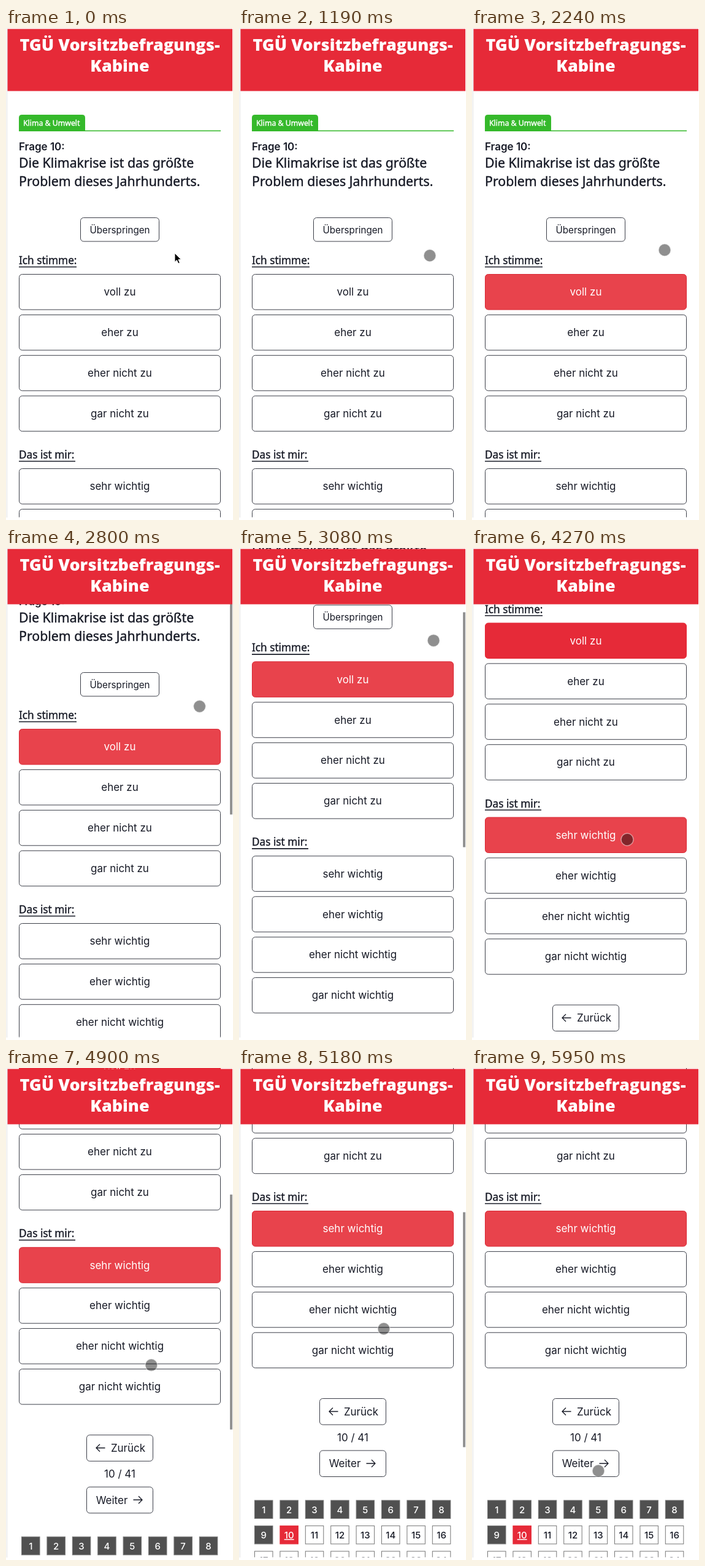
Write an HTML page that moves like this. It is 370x800 px and loops after 6020 ms.

```html
<!DOCTYPE html>
<html lang="de">
<head>
<meta charset="utf-8">
<style>
  html, body { margin: 0; height: 100%; overflow: hidden; background: #fff; }
  svg { display: block; width: 370px; height: 800px; }
  text { font: 17px Inter, sans-serif; fill: #171a26; }
  .mid { text-anchor: middle; }
  .title { font: 800 27px "Open Sans", sans-serif; fill: #fff; }
  .tag, .question, .label { font: 21.3px "Noto Sans", sans-serif; stroke: #171a26; stroke-width: .4; }
  .tag { font-size: 12.3px; fill: #fff; stroke: #fff; }
  .label { font-size: 17.2px; }
  .number { font-weight: 600; }
  .skip { font-size: 15.2px; }
  .cell { font-size: 15px; font-weight: 500; }
  .box { fill: #fff; stroke: #3c3f49; }
  .line { fill: none; stroke: #171a26; stroke-width: 1.7; }
  .thin { stroke-width: 1.3; }
  .done rect { fill: #505050; stroke: #777; }
  .chosen rect { fill: #e62a38; stroke: #e62a38; }
  .hover rect { fill: #e8434c; stroke: #d92a37; }
  .done text, .chosen text { fill: #fff; }
</style>
</head>
<body>
<svg viewBox="0 0 370 800">
  <defs><clipPath id="view"><path d="M0 0H370V795.5H0z"/></clipPath></defs>
  <g clip-path="url(#view)">
    <g id="page"></g>
    <rect id="bar" x="365" width="4" height="382" fill="#929292"/>
  </g>
  <path d="M1.5 0V796" stroke="#e2e2e2"/>
  <rect id="header" x="2.5" y="1.5" width="366.5" fill="#e62a38"/>
  <text class="title mid" x="185.5" y="37">TGÜ Vorsitzbefragungs-</text>
  <text class="title mid" x="185.5" y="71">Kabine</text>
  <circle id="touch" r="10" fill-opacity=".44" stroke="#fff" stroke-opacity=".45" stroke-width="1.5"/>
  <path id="arrow" d="M0 0V14.5L3.4 11.5 5.8 17 8.3 16 6 10.6H10.5z" stroke="#fff"/>
</svg>
<script>
const LOOP = 6020, STEP = 70, CENTER = 185.5;
const $ = id => document.getElementById(id);
const page = $('page');

function add(parent, tag, attrs, text = '') {
  const el = document.createElementNS('http://www.w3.org/2000/svg', tag);
  for (const key in attrs) el.setAttribute(key, attrs[key]);
  el.textContent = text;
  return parent.appendChild(el);
}

const write = (text, x, y, cls, parent = page) => add(parent, 'text', { x, y, class: cls }, text);
const line = (d, cls = '') => add(page, 'path', { d, class: 'line ' + cls });

function button(text, y, width, height, shift = 0, cls = '') {
  const group = add(page, 'g', {});
  add(group, 'rect', { x: CENTER - width / 2, y, width, height, rx: 5, class: 'box' });
  write(text, CENTER + shift, y + height / 2 + 6, 'mid ' + cls, group);
  return group;
}

function choices(title, y, width, options) {
  write(title, 21, y, 'label');
  line(`M21 ${y + 4.5}h${width}`);
  return options.map((text, i) => button(text, y + 16.5 + i * 65.9, 328, 57.5))[0];
}

add(page, 'path', { d: 'M21 168V146q0-5 5-5H124q5 0 5 5V166.5H350V168z', fill: '#35b92b' });
write('Klima & Umwelt', 28, 159, 'tag');
write('Frage 10:', 21, 199, 'number');
write('Die Klimakrise ist das größte', 21, 227, 'question');
write('Problem dieses Jahrhunderts.', 21, 257, 'question');
button('Überspringen', 308.5, 128, 38.5, 0, 'skip');
const agree = choices('Ich stimme:', 384, 94, ['voll zu', 'eher zu', 'eher nicht zu', 'gar nicht zu']);
const weight = choices('Das ist mir:', 700, 92,
  ['sehr wichtig', 'eher wichtig', 'eher nicht wichtig', 'gar nicht wichtig']);
button('Zurück', 1021.5, 108, 42.5, 13.5);
line('M161.5 1042.5H147m6-6l-6 6 6 6', 'thin');
write('10 / 41', CENTER, 1091, 'mid');
button('Weiter', 1106, 108, 42.5, -13);
line('M207.5 1127H222m-6-6l6 6-6 6', 'thin');

for (let n = 1; n <= 24; n++) {
  const x = 25.5 + (n - 1) % 8 * 41.4, y = 1187 + Math.floor((n - 1) / 8) * 41.4;
  const cell = add(page, 'g', { class: n < 10 ? 'done' : n === 10 ? 'chosen' : '' });
  add(cell, 'rect', { x, y, width: 29.5, height: 29.5, fill: '#fff', stroke: '#777' });
  const label = write(n, x + 14.75, y + 20.5, 'mid cell', cell);
  if (n === 10) label.setAttribute('text-decoration', 'underline');
}

// Each gesture eases the pointer, and the page when dragged, to a new position.
const gestures = [
  { from: 0, to: 1190, x: 311, y: 370 },
  { from: 1190, to: 1400, x: 308, y: 424 },
  { from: 1680, to: 1960, x: 314, y: 361 },
  { from: 2369, to: 3396, x: 318, y: 89, scroll: 278.5 },
  { from: 3430, to: 4130, x: 253, y: 474 },
  { from: 4300, to: 4600, x: 239, y: 629 },
  { from: 4600, to: 5065, x: 236, y: 424, scroll: 484 },
  { from: 5250, to: 5900, x: 206, y: 655 },
];
const AGREE_TAP = gestures[1].to, WEIGHT_TAP = gestures[4].to;

function ease(t, from, to) {
  const u = Math.min(1, Math.max(0, (t - from) / (to - from)));
  return u * u * (3 - 2 * u);
}

function poseAt(t) {
  const pose = { x: 275, y: 366, scroll: 0 };
  for (const move of gestures)
    for (const key in pose)
      if (key in move) pose[key] += (move[key] - pose[key]) * ease(t, move.from, move.to);
  return pose;
}

function draw(now) {
  const t = Math.floor(now % LOOP / STEP) * STEP;
  const { x, y, scroll } = poseAt(t);
  const scrolling = gestures.some(g => g.scroll && t > g.from && t < g.to + 500);
  page.setAttribute('transform', `translate(0 ${-scroll})`);
  $('header').setAttribute('height', Math.max(90, 101 - scroll));
  $('bar').setAttribute('y', scroll * .4845);
  $('bar').style.display = scrolling ? '' : 'none';
  agree.setAttribute('class', t < AGREE_TAP ? '' : t < WEIGHT_TAP ? 'chosen hover' : 'chosen');
  weight.setAttribute('class', t < WEIGHT_TAP ? '' : 'chosen hover');
  for (const id of ['arrow', 'touch']) {
    $(id).setAttribute('transform', `translate(${x} ${y})`);
    $(id).style.display = (id === 'arrow') === (t < 210) ? '' : 'none';
  }
}

const start = performance.now();
function frame() {
  draw(performance.now() - start);
  requestAnimationFrame(frame);
}
frame();
</script>
</body>
</html>
```
